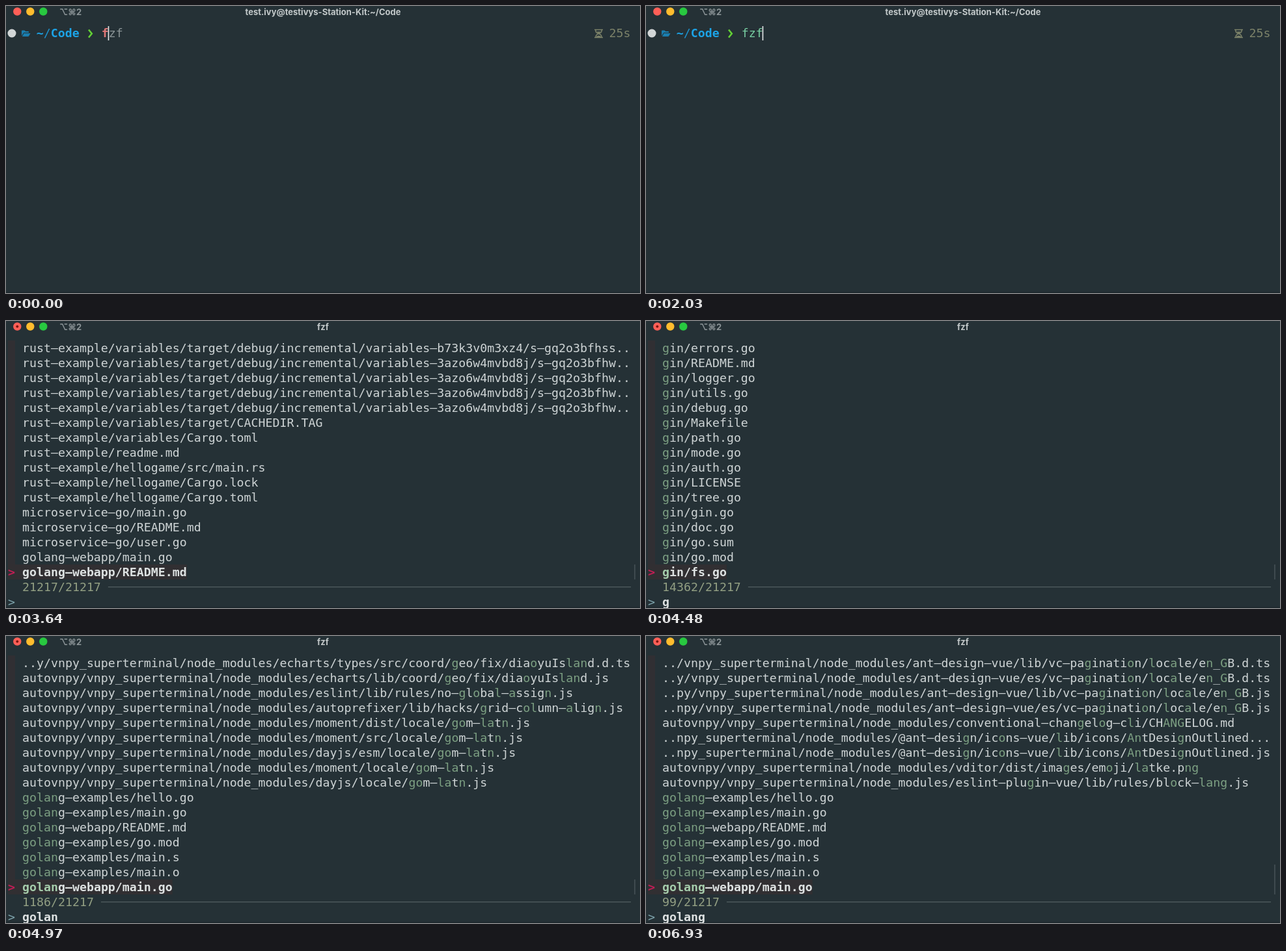
These frames come from a looping animation (974x442 px, 7280 ms). An HTML page with a canvas:

```html
<!DOCTYPE html>
<html lang="en">
<head>
<meta charset="utf-8">
<title>Terminal</title>
<style>
  html, body { margin: 0; width: 974px; height: 442px; overflow: hidden; background: #253136; }
  canvas { display: block; }
</style>
</head>
<body>
<canvas id="stage" width="974" height="442"></canvas>
<script>
const ctx = document.getElementById('stage').getContext('2d');
const LOOP = 7280, CELL = 10.99, ROW = 23, LEFT = 25, BASE = 48;
const MONO = '18.254px "DejaVu Sans Mono", monospace';
const COLOR = { text: '#ced4d5', match: '#7c9f82', strong: '#dde1e1', strongMatch: '#a5ccab' };

// Paths list top to bottom; [brackets] hold the matched characters.
const vendor = 'vnpy_superterminal/node_modules/', modules = 'autovnpy/' + vendor;
const repeat = (prefix, names) => names.split(' ').map(name => prefix + name);
const golang = repeat('[golang]-', 'examples/hello.go examples/main.go webapp/README.md ' +
  'examples/go.mod examples/main.s examples/main.o webapp/main.go');
const build = 'rust-example/variables/target/debug/incremental/variables-';
const hashed = build + '3azo6w4mvbd8j/s-gq2o3bfhw..';

const lists = {
  all: [
    build + 'b73k3v0m3xz4/s-gq2o3bfhss..', hashed, hashed, hashed, hashed,
    ...repeat('rust-example/', 'variables/target/CACHEDIR.TAG variables/Cargo.toml readme.md ' +
      'hellogame/src/main.rs hellogame/Cargo.lock hellogame/Cargo.toml'),
    ...repeat('microservice-go/', 'main.go README.md user.go'),
    ...repeat('golang-webapp/', 'main.go README.md')
  ],
  g: repeat('[g]in/', 'errors.go README.md logger.go utils.go debug.go Makefile path.go mode.go ' +
    'auth.go LICENSE tree.go gin.go doc.go go.sum go.mod fs.go'),
  gol: [
    ...repeat(modules + '@ant-design/icons-vue/', 'es/icons/[Gol]dFilled.js [Gol]denFilled.d.ts ' +
      '[Gol]dOutlined.d.ts [Gol]dTwoTone.d.ts [Gol]denFilled.js [Gol]dOutlined.js ' +
      '[Gol]dFilled.d.ts [Gol]dTwoTone.js [Gol]dFilled.js'),
    ...golang
  ],
  golan: [
    '..y/' + vendor + 'echarts/types/src/coord/[g]eo/fix/dia[o]yuIs[lan]d.d.ts',
    ...repeat(modules, 'echarts/lib/coord/[g]eo/fix/dia[o]yuIs[lan]d.js ' +
      'eslint/lib/rules/no-[g]l[o]ba[l]-[a]ssig[n].js ' +
      'autoprefixer/lib/hacks/[g]rid-c[ol]umn-[a]lig[n].js'),
    ...['moment/dist', 'moment/src', 'dayjs/esm', 'moment', 'dayjs']
      .map(dir => modules + dir + '/locale/[go]m-[la]t[n].js'),
    ...golang
  ],
  golang: [
    ...['../' + vendor + '*lib/#.d.ts', '..y/' + vendor + '*es/#.d.ts',
      '..py/' + vendor + '*lib/#.js', '..npy/' + vendor + '*es/#.js']
      .map(path => path.replace('*', 'ant-design-vue/')
        .replace('#', 'vc-pa[g]inati[o]n/[l]oc[a]le/e[n]_[G]B')),
    modules + 'conventional-chan[g]el[o]g-c[l]i/CH[ANG]ELOG.md',
    ...repeat('..' + vendor.slice(1) + '@ant-desi[g]n/ic[o]ns-vue/[l]ib/icons/[An]tDesi[g]nOutlined',
      '... .js'),
    ...repeat(modules, 'vditor/dist/ima[g]es/em[o]ji/[la]tke.p[ng] ' +
      'eslint-plu[g]in-vue/lib/rules/bl[o]ck-[lang].js'),
    ...golang
  ]
};

// [start, query, list, matches]
const searches = [
  [2310, '', null, 0],
  [2380, '', 'all', 9483],
  [2450, '', 'all', 16120],
  [2520, '', 'all', 21217],
  [4480, 'g', 'g', 14362],
  [4550, 'go', 'g', 14362],
  [4620, 'go', 'gol', 9624],
  [4760, 'gol', 'gol', 7793],
  [4830, 'gola', 'gol', 7793],
  [4900, 'gola', 'golan', 2310],
  [4970, 'golan', 'golan', 1186],
  [5040, 'golang', 'golang', 99]
];

function rect(x, y, w, h, color) {
  ctx.fillStyle = color;
  ctx.fillRect(x, y, w, h);
}

function disc(x, y, r, color) {
  ctx.fillStyle = color;
  ctx.beginPath();
  ctx.arc(x, y, r, 0, 7);
  ctx.fill();
}

function label(text, x, y, color, font, align = 'left') {
  ctx.font = font;
  ctx.textAlign = align;
  ctx.fillStyle = color;
  ctx.fillText(text, x, y);
}

// The terminal face has wide hyphens, so they are shown as en dashes.
function mono(text, x, row, color, bold) {
  label(text.replace(/-/g, '–'), x, BASE + row * ROW, color, (bold ? 'bold ' : '') + MONO);
}

function shape(d, color, width) {
  const path = new Path2D(d);
  ctx.fillStyle = ctx.strokeStyle = color;
  ctx.lineWidth = width;
  if (width) ctx.stroke(path); else ctx.fill(path);
}

function drawWindow(title, running) {
  rect(0, 0, 974, 442, '#253136');
  rect(0, 440.5, 974, 1.5, '#1c272c');
  ['#ff5f57', '#febc2e', '#28c840'].forEach((color, i) => disc(17.3 + 20 * i, 8.5, 6.2, color));
  if (running) disc(17.3, 8.5, 2, '#7d1712');
  const font = 'bold 13px Inter, "DejaVu Sans", sans-serif';
  label('⌥⌘2', 82, 13.5, '#8c9598', font);
  label(title, 487, 13.5, '#c3c9ca', font, 'center');
}

function drawShell(t) {
  drawWindow('test.ivy@testivys-Station-Kit:~/Code', false);
  disc(9, 42, 6.5, '#d2d6d7');
  shape('M24 46V38.5Q24 37.5 25 37.5H28.5L30 39H34Q35 39 35 40V41H28Q27 41 26.5 42Z', '#1a7dae');
  shape('M25 47L27.5 42H37.5L35.2 46.3Q34.8 47 34 47Z', '#1a7dae');
  mono('~', 46.7, 0, '#1ca3e6', true);
  mono('/', 57.7, 0, '#1c93cf');
  mono('Code', 68.7, 0, '#1ca3e6', true);
  shape('M127 36.5L131.8 42.5L127 48.5', '#62cf35', 2.6);
  const typed = t < 210 ? 1 : t < 350 ? 2 : 3, end = 146.7 + typed * CELL;
  const done = typed === 3;
  mono('fzf'.slice(0, typed), 146.7, 0, done ? '#78cfa2' : '#de7777', !done);
  mono('fzf'.slice(typed), end, 0, '#8b9597');
  rect(end - 1, 31, 1.6, 22, '#e6e9ea');
  shape('M904 36.5H917M904 48.5H917M906 37V39Q906 41 910.5 42.5Q915 44 915 48' +
    'M915 37V39Q915 41 910.5 42.5Q906 44 906 48', '#7c8269', 1.5);
  shape('M907 39.5H914L910.5 42.5ZM906.5 48Q907.5 45.5 910.5 45.5T914.5 48Z', '#7c8269');
  mono('25s', 926.5, 0, '#7c8269');
}

function drawPath(path, row, selected, limit) {
  if (selected) rect(3, 30 + row * ROW, 22 + path.replace(/[[\]]/g, '').length * CELL, ROW, '#312f32');
  let column = 0, matched = 0;
  const put = (run, color) => {
    mono(run, LEFT + column * CELL, row, color, selected);
    column += run.length;
  };
  path.split(/[[\]]/).forEach((run, i) => {
    const hits = i % 2 ? Math.min(run.length, limit - matched) : 0;
    matched += hits;
    put(run.slice(0, hits), selected ? COLOR.strongMatch : COLOR.match);
    put(run.slice(hits), selected ? COLOR.strong : COLOR.text);
  });
}

function drawFinder(t) {
  const [, query, list, matches] = searches.filter(([start]) => start <= t).pop();
  drawWindow('fzf', t >= 3010);
  mono('>', 3, 17, '#7fa5ad');
  if (!list) return;
  rect(3, 30, 11, 16 * ROW, '#302f33');
  lists[list].forEach((path, row) => drawPath(path, row, row === 15, query.length));
  mono('>', 3, 15, '#c01e55', true);
  const count = matches + '/' + Math.max(matches, query ? 21217 : 0);
  mono(count, LEFT, 16, '#929f83');
  const ruleX = LEFT + (count.length + 1) * CELL;
  rect(ruleX, 409, 960 - ruleX, 1.2, '#536062');
  const bar = matches < 100 ? 2 * ROW : ROW;
  rect(965.3, 398 - bar, 1.3, bar, '#4d595d');
  mono(query, LEFT, 17, COLOR.strong, true);
}

function frame(now) {
  const t = now % LOOP;
  if (t < 2310) drawShell(t); else drawFinder(t);
  requestAnimationFrame(frame);
}
requestAnimationFrame(frame);
</script>
</body>
</html>
```
